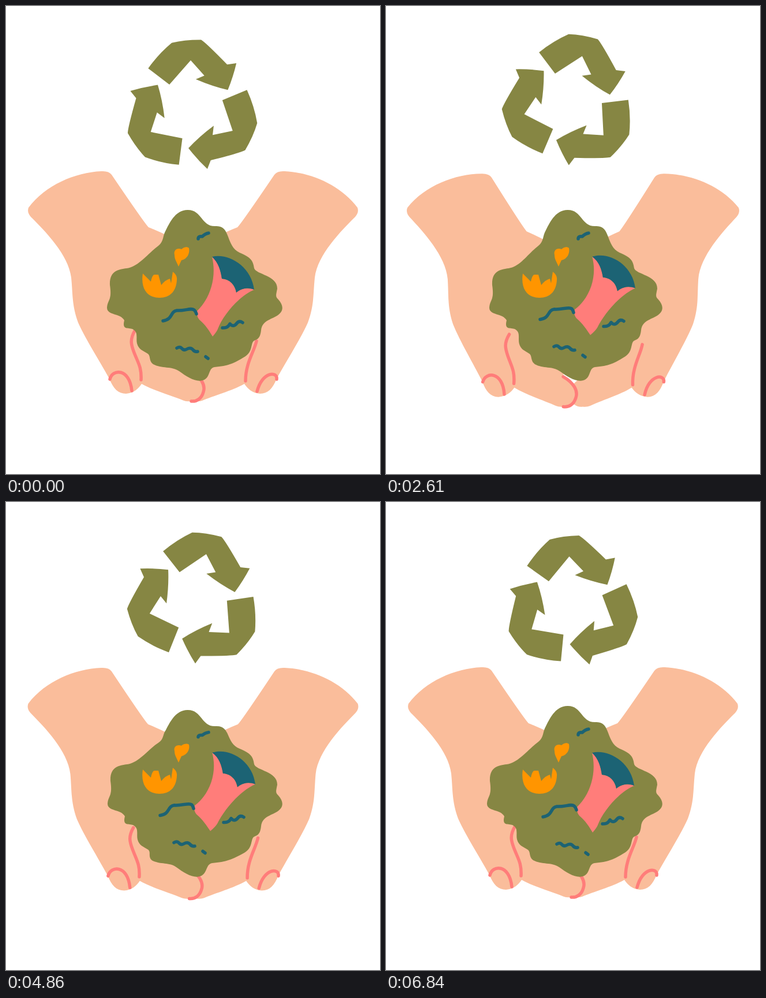
An HTML page for the animation above (6870 ms loop, 648 by 810 pixels).

```html
<!DOCTYPE html>
<html lang="en">
<head>
<meta charset="utf-8">
<title>Compost in hands</title>
<style>
  html, body { margin: 0; width: 100%; height: 100%; overflow: hidden; background: #fff; }
  svg { display: block; width: 100vw; height: 100vh; }
  .line { fill: none; stroke: #ff7d7a; stroke-width: 5.5; stroke-linecap: round; }
  .olive { fill: #868643; }
  .teal { fill: none; stroke: #1c6374; stroke-width: 5.5; stroke-linecap: round; stroke-linejoin: round; }
</style>
</head>
<body>
<svg viewBox="0 0 648 810">
  <defs>
    <path id="hand" fill="#fabd9b" d="M183 292Q178 285 165 286C120 288 68 310 39 349Q36 357 43 365C68 390 108 430 113 470C116 500 114 518 125 548C138 577 162 614 179 645C186 662 194 671 208 671C221 670 229 663 235 654C256 666 290 675 308 683Q313 685 321 684C331 685 339 679 342 668C346 656 338 642 319 632L340 420L285 400Q265 390 247 383Q240 376 183 292Z"/>
    <path id="arrow" d="M-73 -70Q-54 -95 -31 -113Q-8 -118 20 -117Q28 -112 64 -73L80 -75Q74 -52 64 -29Q37 -36 9 -49L24 -55L1 -82L-37 -41Z"/>
    <clipPath id="sky"><rect width="648" height="285"/></clipPath>
  </defs>

  <g class="olive" clip-path="url(#sky)">
    <g id="arrows">
      <g transform="translate(321 176)">
        <use href="#arrow"/>
        <use href="#arrow" transform="rotate(120)"/>
        <use href="#arrow" transform="rotate(240)"/>
      </g>
    </g>
  </g>

  <g transform="translate(648) scale(-1 1)">
    <g class="arm">
      <use href="#hand"/>
      <path class="line" d="M214 580C218 598 233 618 233 649M179 646C177 632 204 632 213 667"/>
    </g>
  </g>
  <g class="arm">
    <use href="#hand"/>
    <path class="line" d="M223 562C214 578 217 587 222 600C229 618 235 625 234 647M180 646C184 628 214 626 218 666M319 632C338 642 346 656 342 668C339 679 331 685 321 684"/>
  </g>

  <path class="olive" id="soil" d="M314 353C340 352 338 383 364 381C390 380 380 415 405 427C421 434 428 438 430 454C434 465 470 466 470 489C468 500 467 502 470 506C482 518 482 529 468 537C455 544 444 546 442 561C440 580 432 576 428 581C424 587 427 600 412 608C396 618 385 623 361 625C351 627 354 640 345 646C333 654 315 643 300 632C287 623 270 628 255 620C247 614 251 606 246 602C237 596 230 595 227 584C225 576 229 566 222 561C215 554 200 564 205 544C198 531 175 536 175 522C176 508 184 510 180 483C179 458 195 456 209 454C230 451 245 429 264 415C274 407 271 398 277 388C286 370 295 354 314 353Z"/>
  <g id="scraps">
    <path fill="#ff9500" d="M292 431C290 423 296 418 304 421C308 417 314 416 317 419C319 428 314 438 304 440C302 444 300 449 299 451C296 443 292 439 292 431Z"/>
    <path fill="#ff9500" d="M237 463L251 477Q253 466 257 465L264 465L269 483Q276 474 284 472L286 480L289 460Q297 466 296 474C295 494 284 505 266 505C245 505 233 490 237 463Z"/>
    <path fill="#ff7d7a" d="M357 434C368 444 372 458 374 472C388 473 397 483 399 496C408 488 418 487 430 491C402 503 375 537 367 559Q365 564 358 572C352 562 346 552 335 543Q330 537 331 528C352 508 366 472 357 434Z"/>
    <path fill="#1c6374" d="M357 434C385 427 425 450 430 491C418 486 408 489 399 496C397 483 388 473 374 472C372 458 368 444 357 434Z"/>
    <path class="teal" d="M333 403Q333 398 340 399Q345 394 351 393"/>
    <path class="teal" d="M272 545C290 542 284 529 296 527C310 528 320 522 326 526Q329 529 330 533"/>
    <path class="teal" d="M375 557Q384 558 388 550Q394 557 400 549Q404 544 410 548"/>
    <path class="teal" d="M296 592Q301 589 304 592Q308 597 313 594Q320 590 324 595Q327 599 332 598"/>
    <path class="teal" d="M346 607L350 610"/>
  </g>
</svg>
<script>
const LOOP = 6870, FRAMES = 191, POSE_MS = 280, POSES = 6;

// How far the soil's top sinks and its foot sways in each held pose
const SINK = [0, 2, 1, 0, 3, 7];
const SWAY = [0, -6, -2, 1, -2, -5];

// 0 at a, 1 at b, held beyond both
const ramp = (v, a, b) => Math.min(1, Math.max(0, (v - a) / (b - a)));
const openness = pose => 1 - Math.cos(2 * Math.PI * pose / POSES);
const sink = (y, pose) => SINK[pose] * ramp(y, 425, 385);

const bendSoil = (x, y, pose) => [
  x + SWAY[pose] * ramp(y, 605, 630) + 2 * openness(pose) * ramp(x, 300, 220) * ramp(y, 420, 460),
  y + sink(y, pose)
];

// Away from the rest pose, low scraps slip left and right-hand ones slip up and right
function bendScrap(x, y, pose) {
  const slip = pose ? 1 : 0, right = ramp(x, 355, 375), low = ramp(y, 505, 530) * (1 - right);
  return [x + slip * (2 * right - 5 * low), y - slip * 2.5 * (right + low) + sink(y, pose)];
}

const arrows = document.getElementById('arrows');
const arms = document.querySelectorAll('.arm');
const soft = (el, bend) => ({ el, bend, d: el.getAttribute('d') });
const parts = [
  soft(document.getElementById('soil'), bendSoil),
  ...[...document.querySelectorAll('#scraps path')].map(el => soft(el, bendScrap))
];
let shown = -1;

function setPose(pose) {
  if (pose === shown) return;
  shown = pose;
  arms.forEach(a => a.setAttribute('transform', `rotate(${openness(pose)} 40 295)`));
  for (const { el, bend, d } of parts) {
    el.setAttribute('d', d.replace(/(\d+) (\d+)/g, (_, x, y) => bend(+x, +y, pose).join(' ')));
  }
}

function draw(t) {
  // Five pictures per 180 ms, the first held twice as long
  const frame = 5 * Math.floor(t / 180) + Math.max(0, Math.floor(t % 180 / 30) - 1);
  arrows.setAttribute('transform', `rotate(${frame * 360 / FRAMES - 1.5} 322 170.5)`);
  setPose(Math.floor((t + 20) / POSE_MS) % POSES);
}

const start = performance.now();
function tick() {
  draw((performance.now() - start) % LOOP);
  requestAnimationFrame(tick);
}
tick();
</script>
</body>
</html>
```
